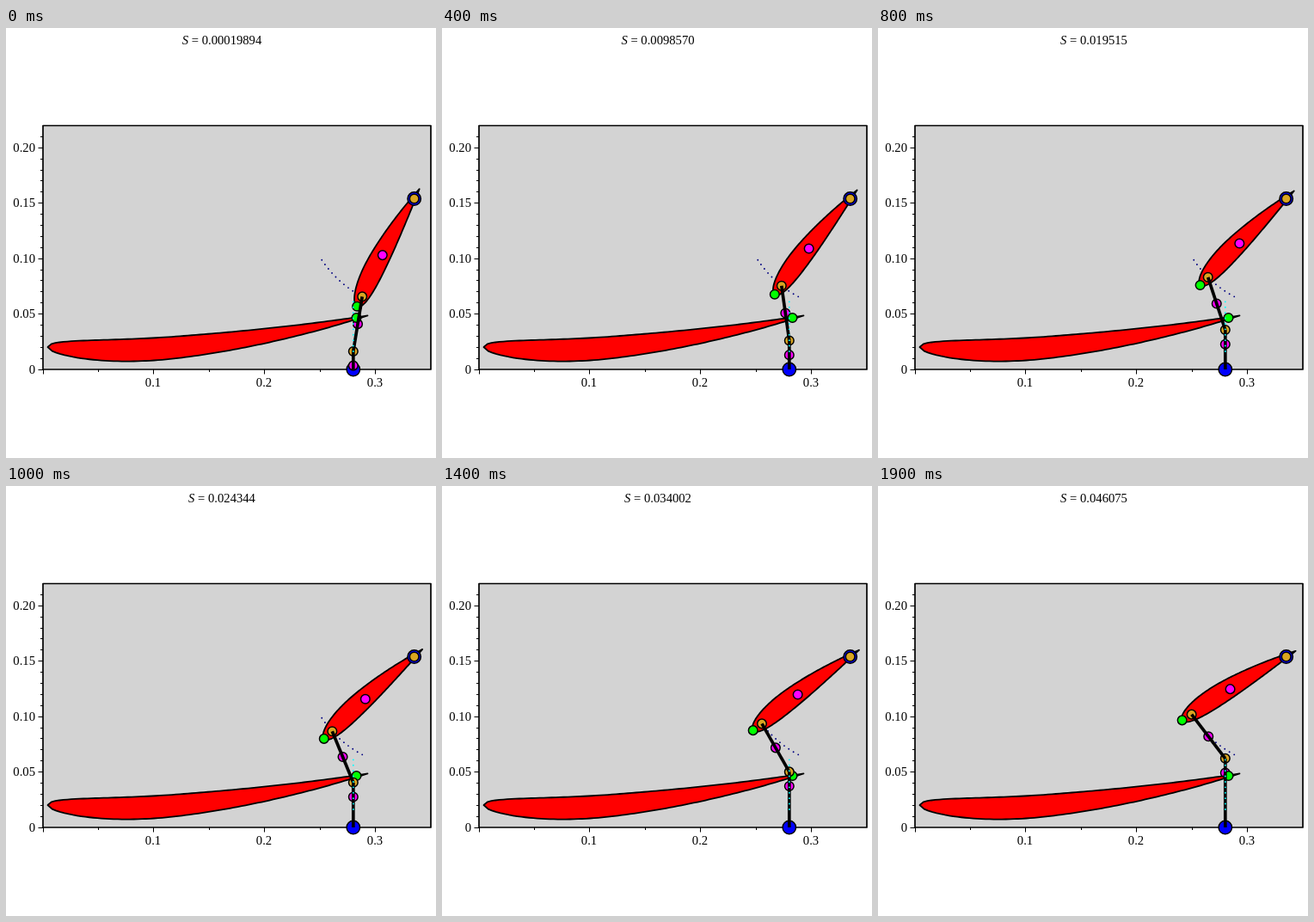
An HTML page with a canvas for the animation above (2 s loop, 500 by 500 pixels).

```html
<!DOCTYPE html>
<html>
<head>
<meta charset="utf-8">
<style>
  html, body { margin: 0; width: 100%; height: 100%; overflow: hidden; background: #fff; }
  canvas { display: block; }
</style>
</head>
<body>
<canvas id="stage" width="500" height="500"></canvas>
<script>
const ctx = document.getElementById('stage').getContext('2d');
const SCALE = 1288.6, STEPS = 20, STEP_MS = 100;
const FONT = '14.67px "Liberation Serif", "Times New Roman", serif';
const X = v => 43 + v * SCALE;
const Y = v => 397 - v * SCALE;

const pivot = [X(0.335), Y(0.154)];
const ground = [X(0.28), Y(0)];
const keelNose = [48.5, 371], keelTail = [420.5, 334.5];
const leverLength = 0.1 * SCALE, rodLength = 0.05 * SCALE;

const valueAt = n => 0.00019894 + 0.002414514 * n;
const sliderAt = n => [ground[0], Y(valueAt(n) + 0.01615)];
const middle = (a, b) => [(a[0] + b[0]) / 2, (a[1] + b[1]) / 2];

// Angle of the lever where its circle meets the circle of the rod
function leverAngle(slider) {
  const dx = slider[0] - pivot[0], dy = slider[1] - pivot[1], d = Math.hypot(dx, dy);
  const cos = (leverLength ** 2 + d * d - rodLength ** 2) / (2 * leverLength * d);
  return Math.atan2(dy, dx) + Math.acos(cos);
}

function stroke(width, color = '#000') {
  ctx.lineWidth = width;
  ctx.strokeStyle = color;
  ctx.stroke();
}

function line(a, b, width) {
  ctx.beginPath();
  ctx.moveTo(...a);
  ctx.lineTo(...b);
  stroke(width);
}

function strokeDots(color) {
  ctx.lineCap = 'round';
  ctx.setLineDash([0, 6.4]);
  stroke(1.9, color);
  ctx.setLineDash([]);
  ctx.lineCap = 'butt';
}

function disc([x, y], color, radius = 5.3) {
  ctx.beginPath();
  ctx.arc(x, y, radius, 0, 7);
  ctx.fillStyle = color;
  ctx.fill();
  stroke(1.5);
}

// Four-digit wing section; a positive camber bends it to the left of nose-to-tail
function airfoil(nose, tail, camber, thickness) {
  const dx = tail[0] - nose[0], dy = tail[1] - nose[1], peak = 0.4, samples = 80;
  ctx.beginPath();
  for (let i = -samples; i <= samples; i++) {
    const x = Math.abs(i) / samples;
    const half = 5 * thickness * (0.2969 * Math.sqrt(x) - 0.126 * x
      - 0.3516 * x ** 2 + 0.2843 * x ** 3 - 0.1036 * x ** 4);
    const bend = camber * (1 - ((x - peak) / (x < peak ? peak : 1 - peak)) ** 2);
    const y = bend + Math.sign(i) * half;
    ctx.lineTo(nose[0] + x * dx + y * dy, nose[1] + x * dy - y * dx);
  }
  ctx.closePath();
  ctx.fillStyle = '#f00';
  ctx.fill();
  ctx.lineJoin = 'round';
  stroke(1.8);
}

function axes() {
  const crisp = v => Math.floor(v) + 0.5;
  ctx.fillStyle = '#d3d3d3';
  ctx.beginPath();
  ctx.rect(43, 113.5, 451, 283.5);
  ctx.fill();
  stroke(1.7);
  ctx.fillStyle = '#000';
  ctx.font = FONT;
  ctx.textAlign = 'right';
  for (let i = 0; i <= 21; i++) {
    const y = crisp(Y(i / 100)), major = i % 5 === 0;
    line([major ? 37.5 : 40, y], [43, y], 1);
    if (major) ctx.fillText(i ? (i / 100).toFixed(2) : '0', 34, Math.round(y + 4.5));
  }
  ctx.textAlign = 'center';
  for (let i = 0; i <= 6; i++) {
    const x = crisp(X(i / 20)), major = i % 2 === 0;
    line([x, 397], [x, major ? 402.5 : 400], 1);
    if (major && i) ctx.fillText((i / 20).toFixed(1), x - 0.5, 417);
  }
}

function title(value) {
  const rest = ' = ' + value.toPrecision(5);
  ctx.textAlign = 'left';
  ctx.font = 'italic ' + FONT;
  const symbolWidth = ctx.measureText('S').width;
  ctx.font = FONT;
  const left = 251 - (symbolWidth + ctx.measureText(rest).width) / 2;
  ctx.fillText(rest, left + symbolWidth, 19);
  ctx.font = 'italic ' + FONT;
  ctx.fillText('S', left, 19);
}

function draw(n) {
  ctx.clearRect(0, 0, 500, 500);
  axes();
  title(valueAt(n));

  const slider = sliderAt(n), first = sliderAt(0), last = sliderAt(STEPS - 1);
  const angle = leverAngle(slider);
  const fromPivot = (r, turn = 0) =>
    [pivot[0] + r * Math.cos(angle + turn), pivot[1] + r * Math.sin(angle + turn)];
  const joint = fromPivot(leverLength), leverTip = fromPivot(0.11 * SCALE);

  ctx.beginPath();
  ctx.arc(...pivot, leverLength, leverAngle(first), leverAngle(last));
  strokeDots('#000080');

  airfoil(keelNose, keelTail, -0.04, 0.07);
  airfoil(leverTip, fromPivot(-0.01 * SCALE), 0.02, 0.15);
  disc(ground, '#00f', 7.7);
  disc(pivot, '#00f', 7.7);

  disc(fromPivot(75.2, 0.024), '#f0f');
  disc([ground[0], Y(valueAt(n) + 0.0032)], '#f0f');
  disc(middle(slider, joint), '#f0f');
  disc([407.5, 337], '#0f0');
  disc(leverTip, '#0f0');
  for (const point of [pivot, slider, joint]) disc(point, '#daa520');

  line(ground, slider, 3.7);
  line(slider, joint, 3.7);
  ctx.beginPath();
  ctx.moveTo(...first);
  ctx.lineTo(...last);
  strokeDots('#0ff');
}

function tick() {
  draw(Math.floor(performance.now() / STEP_MS) % STEPS);
  requestAnimationFrame(tick);
}
tick();
</script>
</body>
</html>
```
